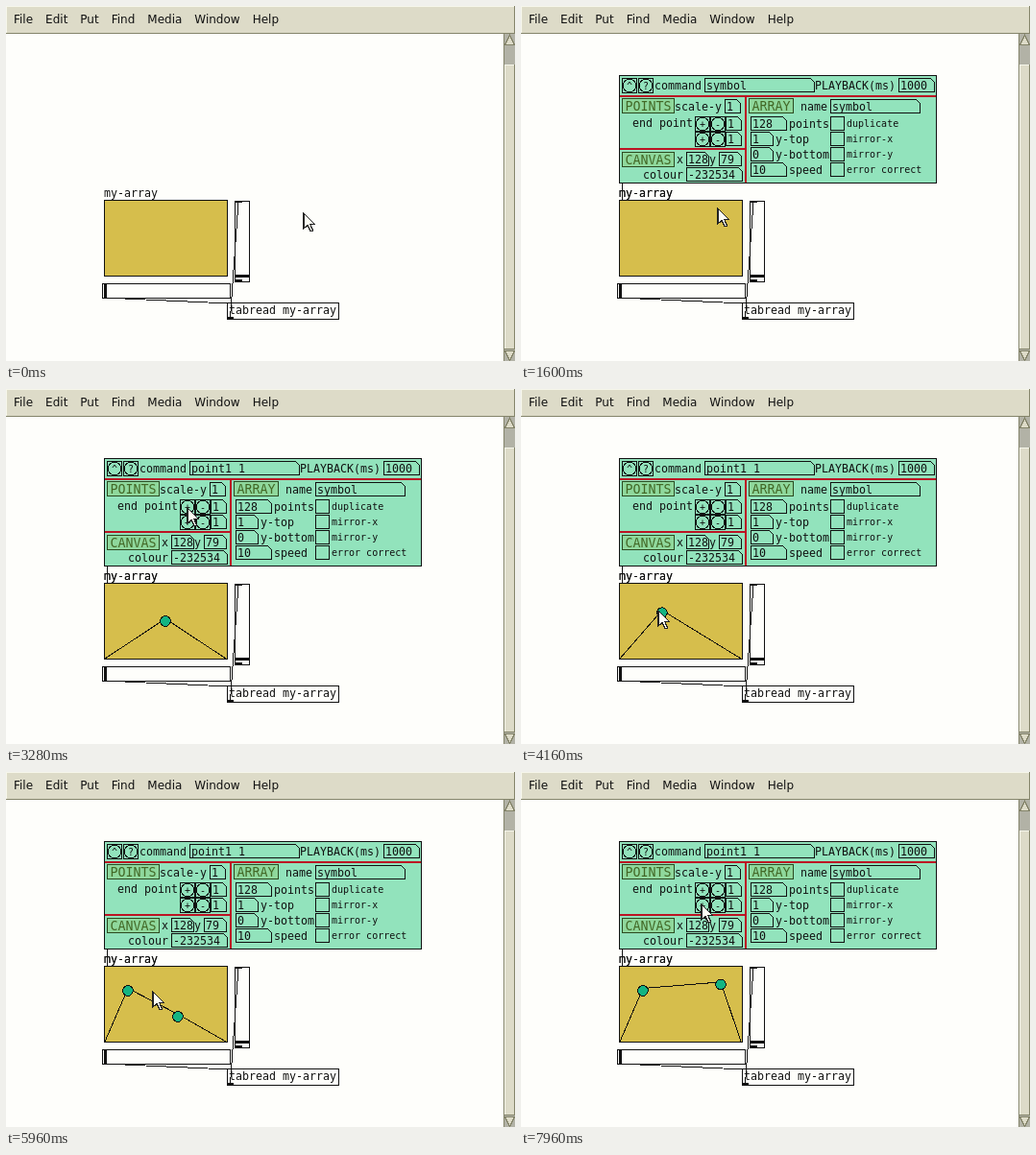
An HTML page that plays this animation: 530x370 px, repeating every 8 s.

```html
<!DOCTYPE html>
<html lang="en">
<head>
<meta charset="utf-8">
<title>Array editor</title>
<style>
  html, body { margin: 0; width: 100%; height: 100%; overflow: hidden; background: #fefefb; }
  svg { display: block; width: 530px; height: 370px; shape-rendering: crispEdges; }
  text { white-space: pre; fill: #111; }
  .ui { font: 12px "DejaVu Sans", sans-serif; }
  .patch { font: 11.63px "DejaVu Sans Mono", monospace; }
  .small { font: 10px "DejaVu Sans Mono", monospace; }
  .title { font: 13.3px "DejaVu Sans Mono", monospace; fill: #426826; }
</style>
</head>
<body>
<svg id="stage" viewBox="0 0 530 370">
  <defs>
    <filter id="blur" x="-60%" y="-60%" width="220%" height="220%"><feGaussianBlur stdDeviation="13"/></filter>
  </defs>
</svg>
<script>
const LOOP = 8000, ROW = 16, CHAR = 7;
const INK = '#111', FACE = '#dddbc8', SHADE = '#84846a', PAPER = '#fefefb';
const GREEN = '#92e3bc', GOLD = '#d6be4c', RED = '#bc1424';
const stage = document.getElementById('stage');

function add(parent, tag, attrs, content) {
  const node = document.createElementNS('http://www.w3.org/2000/svg', tag);
  for (const key in attrs) node.setAttribute(key, attrs[key]);
  if (content !== undefined) node.textContent = content;
  parent.appendChild(node);
  return node;
}
const fillRect = (p, x, y, width, height, fill) => add(p, 'rect', { x, y, width, height, fill });
const path = (p, d, stroke = INK, fill = 'none', width = 1) =>
  add(p, 'path', { d, stroke, fill, 'stroke-width': width });
const box = (p, x, y, w, h, fill, stroke = INK) =>
  add(p, 'rect', { x: x + .5, y: y + .5, width: w - 1, height: h - 1, fill, stroke });
const label = (p, x, y, str, style = 'patch') => add(p, 'text', { x, y, class: style }, str);

function bevel(p, x, y, w, h) {
  fillRect(p, x, y, w, h, SHADE);
  fillRect(p, x, y, w - 1, h - 1, '#f6f6ea');
  fillRect(p, x + 1, y + 1, w - 2, h - 2, FACE);
}
// A value field is as wide as the characters it has room for.
function field(p, x, y, chars, str) {
  const right = x + CHAR * chars + 2.5;
  path(p, `M${x + .5} ${y + .5}H${right - 4}l4 4V${y + 14.5}H${x + .5}Z`, INK, GREEN);
  return label(p, x + 2, y + 12, str);
}
function button(p, x, y, sign) {
  box(p, x, y, ROW, ROW, GREEN);
  add(p, 'circle', { cx: x + 8, cy: y + 8, r: 6.8, fill: GREEN, stroke: INK });
  add(p, 'text', { x: x + 8, y: y + 12, class: 'small', 'text-anchor': 'middle' }, sign);
}
function heading(p, x, y, str) {
  box(p, x, y, 8 * str.length + 7, ROW, '#8fd89c', '#2c4a20');
  label(p, x + 3.5, y + 13, str, 'title');
}

function drawWindow() {
  fillRect(stage, 0, 0, 530, 370, PAPER);
  bevel(stage, 0, 0, 530, 29);
  const bar = label(stage, 8, 18, '', 'ui');
  ['File', 'Edit', 'Put', 'Find', 'Media', 'Window', 'Help']
    .forEach((str, i) => add(bar, 'tspan', { dx: i ? 13 : 0 }, str));
  fillRect(stage, 518, 29, 12, 341, '#b2b2a6');
  fillRect(stage, 518, 29, 1, 341, SHADE);
  bevel(stage, 519, 61, 11, 297);
  path(stage, 'M519.5 40.5l5 -10l5 10Z', SHADE, FACE);
  path(stage, 'M519.5 359.5l5 10l5 -10Z', SHADE, FACE);
}

function drawPatch() {
  label(stage, 102, 199, 'my-array');
  box(stage, 102, 202, 129, 80, GOLD);
  box(stage, 238, 203, 16, 85, PAPER);
  fillRect(stage, 239, 280, 14, 3, INK);
  fillRect(stage, 239, 204, 7, 1, INK);
  fillRect(stage, 239, 285, 7, 2, INK);
  box(stage, 100, 289, 134, 16, PAPER);
  fillRect(stage, 102, 290, 3, 14, INK);
  box(stage, 230, 309, 117, 18, PAPER);
  fillRect(stage, 230, 324, 7, 2, INK);
  label(stage, 232, 321, 'tabread my-array');
  path(stage, 'M242 204L233.5 325M102 304L232 310');
}

function drawPanel() {
  const g = add(stage, 'g', {});
  path(g, 'M105.5 185V203');
  label(g, 102, 199, 'my-array');
  box(g, 102, 72, 331, 113, GREEN);
  path(g, 'M103 94H432M234 94V184M103 149H234', RED, 'none', 2);

  button(g, 105, 75, '^');
  button(g, 122, 75, '?');
  label(g, 139, 87, 'command');
  const command = field(g, 191, 75, 16, 'symbol');
  label(g, 306, 87, 'PLAYBACK(ms)');
  field(g, 393, 75, 5, '1000');

  heading(g, 105, 96, 'POINTS');
  label(g, 160, 109, 'scale-y');
  field(g, 212, 97, 2, '1');
  label(g, 116, 126, 'end point');
  for (const y of [115, 115 + ROW]) {
    button(g, 181, y, '+');
    button(g, 181 + ROW, y, '-');
    field(g, 213, y, 2, '1');
  }
  heading(g, 105, 152, 'CANVAS');
  label(g, 162, 164, 'x');
  field(g, 172, 152, 3, '128');
  label(g, 196, 164, 'y');
  field(g, 206, 152, 3, '79');
  label(g, 127, 180, 'colour');
  field(g, 172, 168, 8, '-232534');

  heading(g, 237, 96, 'ARRAY');
  label(g, 291, 109, 'name');
  field(g, 322, 97, 13, 'symbol');
  ['128 points duplicate', '1 y-top mirror-x', '0 y-bottom mirror-y', '10 speed error correct']
    .forEach((line, i) => {
      const [value, name, ...option] = line.split(' ');
      const y = 115 + ROW * i, chars = value.length > 1 ? 5 : 3;
      field(g, 239, y, chars, value);
      label(g, 244 + CHAR * chars, y + 12, name);
      box(g, 322, y, 15, 15, GREEN);
      label(g, 339, y + 11, option.join(' '), 'small');
    });
  return { g, command };
}

function drawMenu() {
  const g = add(stage, 'g', {});
  add(g, 'rect', { x: 158, y: 193, width: 94, height: 66, fill: '#e6bd28', opacity: .4, filter: 'url(#blur)' });
  bevel(g, 163, 195, 82, 59);
  const highlight = box(g, 164, 196, 80, 19, '#eeecc8', '#a0a07c');
  ['Properties', 'Open', 'Help'].forEach((str, i) => label(g, 168, 209 + 19 * i, str, 'ui'));
  return { g, highlight };
}

drawWindow();
drawPatch();
const panel = drawPanel();
const curve = path(stage, '');
const dots = [0, 1].map(() => add(stage, 'circle', { r: 5.3, fill: '#14b482', stroke: INK }));
const menu = drawMenu();
const pointer = path(stage, 'M0 0V16L4 12.5L7 19L9.5 18L6.8 11.5H11.5Z', '#222', '#fdfdf4', 1.2);

const MENU_OPEN = 880, MENU_CLOSE = 1360, PANEL_OPEN = 1480;
const first = { born: 2760, from: 3700, to: 4640 };
const second = { born: 5240, from: 6320, sweep: 6420, to: 6860, release: 6960 };

// Where the hand goes: time of leaving, then the place it heads for.
const START = [310, 216];
const stops = [
  [330, 163, 195], [900, 205, 211], [1740, 198, 112], [2440, 189, 122], [3250, 162, 240],
  [first.from, 123, 226], [4680, 191, 124], [5480, 146, 223], [5900, 182, 255],
  [second.from, 212, 220], [7000, 202, 84], [7520, 188, 138]
];

const mix = (a, b, k) => a + (b - a) * k;
const progress = (t, from, to) => Math.min(1, Math.max(0, (t - from) / (to - from)));
const smooth = k => k * k * (3 - 2 * k);
const show = (node, on) => node.setAttribute('visibility', on ? 'inherit' : 'hidden');

function firstDot(t) {
  const k = progress(t, first.from, first.to);
  return [mix(166, 127, k), 228 + 14 * (1 - k) ** 1.5];
}
// Height of the second drag: almost level, with one short dip.
const ridge = x => 224 - .06 * (x - 165) + 9 * Math.exp(-(((x - 191) / 2) ** 2));
function secondDot(t) {
  if (t < second.sweep) {
    const k = progress(t, second.from, second.sweep);
    return [mix(179, 165, k), mix(255, ridge(165), k)];
  }
  const x = mix(165, 208, progress(t, second.sweep, second.to));
  return [x, ridge(x)];
}

function pointerAt(t) {
  if (t > first.from && t < first.to) {
    const [x, y] = firstDot(t);
    return [x - 4, y - 2];
  }
  if (t > second.from && t < second.to) {
    const [x, y] = secondDot(t);
    return [x + 4, y - 1];
  }
  return stops.reduce(([x, y], [leave, toX, toY]) => {
    const travel = 100 + 2.5 * Math.hypot(toX - x, toY - y);
    const k = smooth(progress(t, leave, leave + travel));
    return [mix(x, toX, k), mix(y, toY, k)];
  }, START);
}

function drawCurve(t) {
  const ends = [firstDot(t), secondDot(t)];
  const points = [];
  if (t >= first.born) points.push([ends[0][0], ends[0][1] - 2.5]);
  if (t >= second.born) {
    const [x, y] = ends[1];
    // The swept line stays in the array until the point is released.
    if (t > second.sweep && t < second.release)
      for (let trailX = 165; trailX < x; trailX += 2) points.push([trailX, ridge(trailX)]);
    points.push([x, y - 2.5]);
  }
  curve.setAttribute('d', 'M' + [[103, 281], ...points, [229, 281]].map(p => p.join(' ')).join('L'));
  dots.forEach((dot, i) => {
    dot.setAttribute('cx', ends[i][0]);
    dot.setAttribute('cy', ends[i][1]);
    show(dot, t >= [first, second][i].born);
  });
}

function render(t) {
  const [x, y] = pointerAt(t);
  pointer.setAttribute('transform', `translate(${Math.round(x)} ${Math.round(y)})`);
  show(menu.g, t >= MENU_OPEN && t < MENU_CLOSE);
  show(menu.highlight, t >= MENU_OPEN + 80);
  show(panel.g, t >= PANEL_OPEN);
  panel.command.textContent = t < first.born ? 'symbol' : 'point1 1';
  drawCurve(t);
}
function tick() {
  render(performance.now() % LOOP);
  requestAnimationFrame(tick);
}
tick();
</script>
</body>
</html>
```
